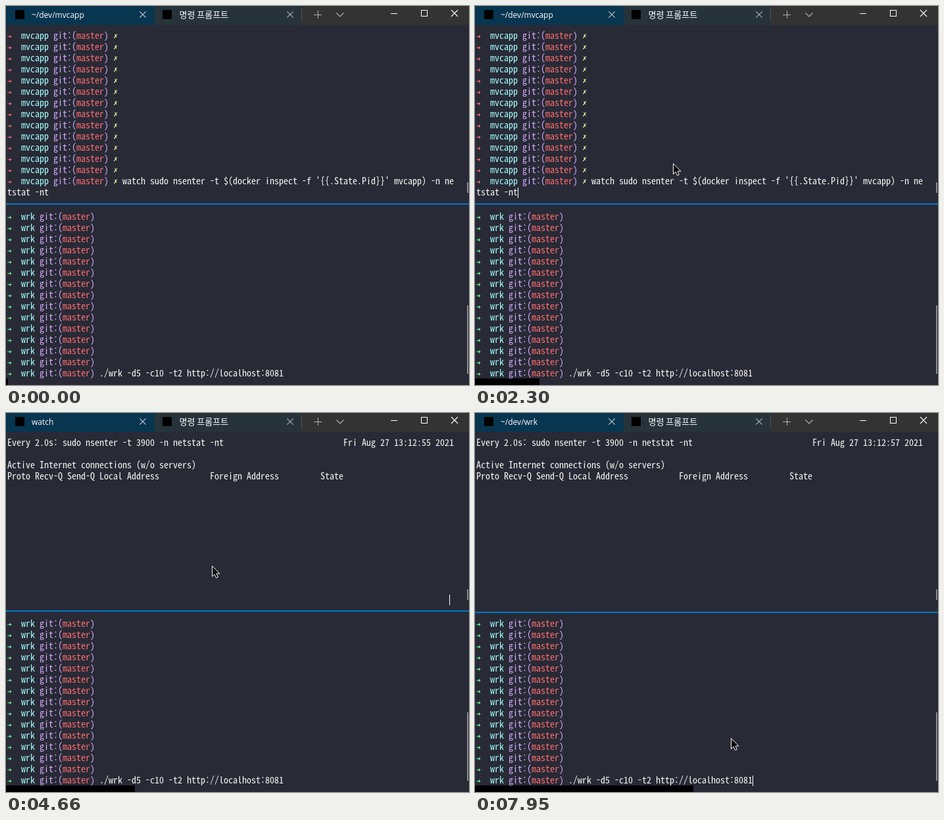
An HTML page with a canvas for the animation above (8 s loop, 704x576 px).

```html
<!DOCTYPE html>
<html lang="ko">
<head>
<meta charset="utf-8">
<title>Terminal</title>
<style>
html, body { margin: 0; width: 100%; height: 100%; overflow: hidden; background: #282a36; }
canvas { display: block; }
</style>
</head>
<body>
<canvas id="stage" width="704" height="576"></canvas>
<script>
const ctx = document.getElementById('stage').getContext('2d');
const LOOP = 8000, STEP = 69.7;
const CELL = 7, ROW = 17, LEFT = 2, TOP_Y = 37, BOTTOM_Y = 312;
const C = {
  bg: '#282a36', text: '#f8f8f2', cyan: '#a4ffff', purple: '#d6acff',
  red: '#ff6e6e', green: '#69ff94', yellow: '#ffffa5', focus: '#0078c8'
};
const MONO = '"Noto Sans Mono CJK KR", "Noto Sans Mono CJK JP", "Noto Sans Mono", monospace';
const SYMBOL = '"DejaVu Sans", sans-serif';

// Moments of change in ms
const CARET_ON = 2090, WATCH = 4590, FOCUS = 6400, REFRESH = 6800;
const BLINK = [7090, 7640];
const CLICKS = [[2930, 3240], [6400, 6640]];

// Pointer path: time, x, y
const PATH = [
  [930, 570, 574], [1080, 455, 390], [1270, 322, 237], [1510, 294, 285],
  [1740, 296, 281], [2250, 301, 240], [2580, 300, 224], [2860, 290, 207],
  [3450, 290, 207], [3760, 313, 232], [5920, 313, 232], [6340, 387, 495],
  [6640, 387, 495], [6780, 389, 494]
];

// Font size that gives one cell per character
function monoSize() {
  ctx.font = '14px ' + MONO;
  return 14 * CELL / (ctx.measureText('M'.repeat(20)).width / 20);
}
const monoFont = monoSize() + 'px ' + MONO;

function rect(x, y, w, h, color) {
  ctx.fillStyle = color;
  ctx.fillRect(x, y, w, h);
}

function label(str, x, y, font, color) {
  ctx.font = font;
  ctx.fillStyle = color;
  ctx.fillText(str, x, y);
}

function cells(str, col, row, y0, color = C.text) {
  label(str, LEFT + col * CELL, y0 + row * ROW + 13, monoFont, color);
}

function lines(color, width, ...paths) {
  ctx.strokeStyle = color;
  ctx.lineWidth = width;
  ctx.beginPath();
  for (const p of paths) p.forEach(([x, y], i) => i ? ctx.lineTo(x, y) : ctx.moveTo(x, y));
  ctx.stroke();
}

function cross(x, y, r, color) {
  lines(color, 1.1, [[x - r, y - r], [x + r, y + r]], [[x + r, y - r], [x - r, y + r]]);
}

function prompt(dir, row, y0, arrow, dirty) {
  const col = 4 + dir.length, base = y0 + row * ROW + 13;
  label('➜', LEFT, base - 1, '8.5px ' + SYMBOL, arrow);
  cells(dir, 3, row, y0, C.cyan);
  cells('git:(', col, row, y0, C.purple);
  cells('master', col + 5, row, y0, C.red);
  cells(')', col + 11, row, y0, C.purple);
  if (dirty) label('✗', LEFT + (col + 13) * CELL, base - 1, '9px ' + SYMBOL, C.yellow);
}

function caret(col, row, y0) {
  rect(LEFT + col * CELL, y0 + row * ROW + 1, 1, 16, '#ffffff');
}

function drawTabs(title) {
  rect(0, 0, 704, 29, '#333333');
  rect(0, 0, 226, 29, '#083650');
  rect(226, 0, 223, 29, '#26333b');
  rect(449, 4, 1, 19, '#50565a');
  rect(14, 6, 14, 14, '#000000');
  rect(238, 6, 14, 14, '#000000');
  label(title, 39, 18, '12px "Open Sans", "Noto Sans", sans-serif', '#ffffff');
  label('명령 프롬프트', 263.5, 18, '13px "Noto Sans CJK KR", "Noto Sans CJK JP", sans-serif', '#ffffff');
  cross(208, 13, 4.7, '#c3ccd2');
  cross(432, 13, 4.7, '#b0b4b7');
  lines('#b4b4b4', 1, [[468, 13.5], [480, 13.5]], [[474.5, 7], [474.5, 19]]);
  lines('#b4b4b4', 1.1, [[502.5, 10.5], [508, 16], [513.5, 10.5]]);
  lines('#ffffff', 1, [[585, 11.5], [595, 11.5]]);
  ctx.strokeRect(631.5, 6.5, 9, 9);
  cross(682, 11, 5, '#ffffff');
}

function drawShell() {
  for (let i = 0; i < 14; i++) prompt('mvcapp', i, TOP_Y, C.red, true);
  cells("watch sudo nsenter -t $(docker inspect -f '{{.State.Pid}}' mvcapp) -n ne", 25, 13, TOP_Y);
  cells('tstat -nt', 0, 14, TOP_Y);
}

function drawWatch(sec) {
  cells('Every 2.0s: sudo nsenter -t 3900 -n netstat -nt', 0, 0, TOP_Y);
  cells('Fri Aug 27 13:12:' + sec + ' 2021', 73, 0, TOP_Y);
  cells('Active Internet connections (w/o servers)', 0, 2, TOP_Y);
  cells('Proto Recv-Q Send-Q Local Address', 0, 3, TOP_Y);
  cells('Foreign Address', 44, 3, TOP_Y);
  cells('State', 68, 3, TOP_Y);
}

function drawWrk() {
  for (let i = 0; i < 15; i++) prompt('wrk', i, BOTTOM_Y, C.green, false);
  cells('./wrk -d5 -c10 -t2 http://localhost:8081', 20, 14, BOTTOM_Y);
}

function pointerAt(t) {
  const i = PATH.findIndex(p => p[0] > t);
  if (i === 0) return null;
  if (i < 0) return PATH[PATH.length - 1].slice(1);
  const [t0, x0, y0] = PATH[i - 1], [t1, x1, y1] = PATH[i];
  const u = (t - t0) / (t1 - t0), e = u * u * (3 - 2 * u);
  return [x0 + (x1 - x0) * e, y0 + (y1 - y0) * e];
}

function drawPointer(t) {
  const pos = pointerAt(t);
  if (!pos) return;
  const [x, y] = pos.map(Math.round);
  if (CLICKS.some(([a, b]) => t >= a && t < b)) {
    ctx.fillStyle = '#908e1b';
    ctx.beginPath();
    ctx.arc(x, y - 1, 12, 0, 2 * Math.PI);
    ctx.fill();
  }
  const arrow = [[0, 0], [0, 16], [3.7, 12.6], [6, 18], [8.8, 16.9], [6.5, 11.6], [11.3, 11.6]];
  ctx.beginPath();
  for (const [dx, dy] of arrow) ctx.lineTo(x + 0.5 + dx, y + 0.5 + dy);
  ctx.closePath();
  ctx.fillStyle = '#000000';
  ctx.fill();
  ctx.strokeStyle = '#ffffff';
  ctx.lineWidth = 1;
  ctx.stroke();
}

function draw(time) {
  const step = Math.floor((time + 10) / STEP);
  const t = step * STEP;
  const watching = t >= WATCH, below = t >= FOCUS;

  rect(0, 0, 704, 576, C.bg);
  drawTabs(below ? '~/dev/wrk' : watching ? 'watch' : '~/dev/mvcapp');
  if (watching) drawWatch(t < REFRESH ? 55 : 57);
  else drawShell();
  drawWrk();

  rect(0, below ? 302 : 300, 704, 2, C.focus);
  rect(701, 268, 2, 16, '#8c8d92');
  rect(701, 455, 2, 104, '#8c8d92');

  if (below) {
    if (t < BLINK[0] || t >= BLINK[1]) caret(60, 14, BOTTOM_Y);
  } else if (watching) caret(96, 14, TOP_Y);
  else if (t >= CARET_ON) caret(9, 14, TOP_Y);

  drawPointer(t);
  rect(0, 566, Math.round(3 + step * 2.886), 10, '#000000');
}

function tick() {
  draw(performance.now() % LOOP);
  requestAnimationFrame(tick);
}
tick();
</script>
</body>
</html>
```
